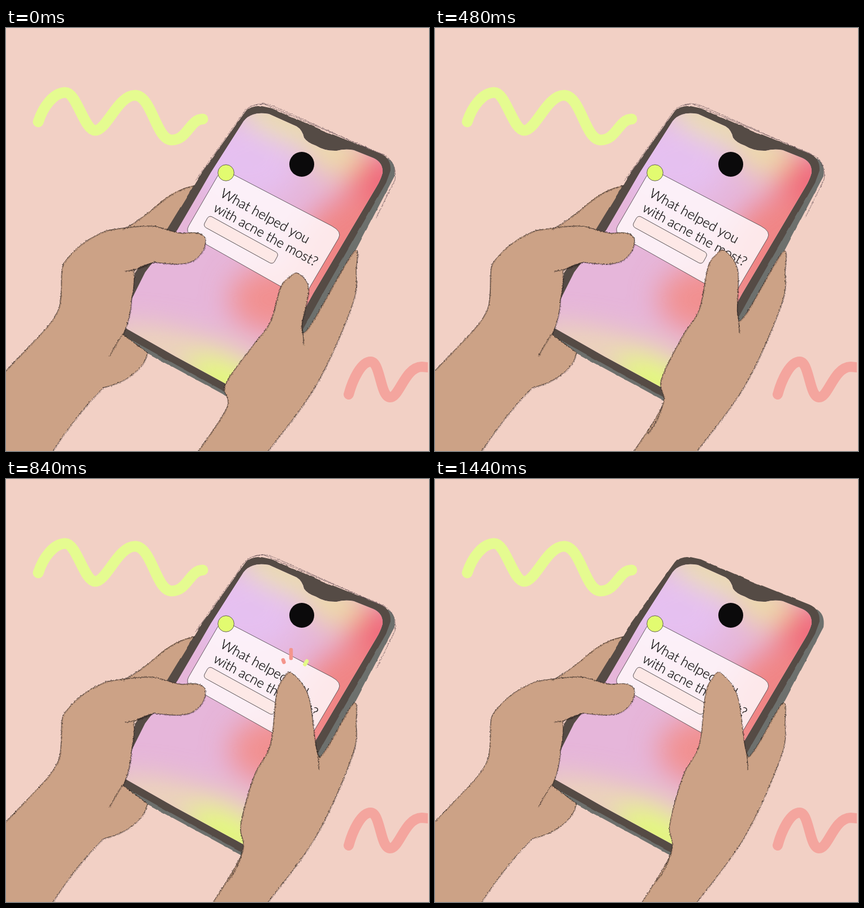
An HTML page that plays this animation: 748 by 748 pixels, repeating every 1.56 s.

```html
<!DOCTYPE html>
<html lang="en">
<head>
<meta charset="utf-8">
<title>Phone survey</title>
<style>
  html, body { margin: 0; height: 100%; overflow: hidden; background: #f2d0c5; }
  svg { display: block; }
  #stage { width: 100vw; height: 100vh; }
  .line { fill: none; stroke-linecap: round; stroke-linejoin: round; }
  .ink { stroke: #2f2521; opacity: .85; }
  .skin { fill: #cca286; }
  .coral { stroke: #f4958c; }
  .lime { stroke: #e4fb88; }
  #edge { stroke: #5c4750; stroke-width: .8; }
  #sparks path { stroke-width: 6.5; vector-effect: non-scaling-stroke; }
  text { font: 300 23.7px Lato, sans-serif; fill: #111; stroke: #111; stroke-width: .3; }
</style>
</head>
<body>
<svg id="stage" viewBox="0 0 748 748">
  <defs>
    <filter id="paint" filterUnits="userSpaceOnUse" x="0" y="0" width="748" height="748">
      <feTurbulence type="fractalNoise" baseFrequency=".04" numOctaves="2" seed="4"/>
      <feDisplacementMap in="SourceGraphic" scale="3" xChannelSelector="R" yChannelSelector="G"/>
    </filter>
    <filter id="pencil" filterUnits="userSpaceOnUse" x="0" y="0" width="748" height="748">
      <feTurbulence id="grain" type="fractalNoise" baseFrequency=".35" numOctaves="2"/>
      <feDisplacementMap in="SourceGraphic" scale="3.5" xChannelSelector="R" yChannelSelector="G"/>
    </filter>
    <filter id="soft" filterUnits="userSpaceOnUse" x="100" y="50" width="700" height="700">
      <feGaussianBlur stdDeviation="25"/>
    </filter>
    <clipPath id="screen">
      <path d="M437 153Q448 149 465 152L514 174Q524 180 527 194Q533 203 548 208Q564 218 585 217Q600 213 615 216L650 230Q667 238 666 256Q662 270 655 281L543 470L440 657L300 581L212 531Q215 505 223 478L246 432L303 357L362 256L420 165Q427 156 437 153Z"/>
    </clipPath>
    <path id="leftShape" d="M-8 614L60 543Q90 512 95 490C101 450 94 425 104 413C128 382 150 370 178 358C215 352 250 348 266 351C285 356 295 361 312 363C330 361 345 360 352 371C355 388 345 403 332 411C318 419 300 419 262 414Q240 420 226 429Q228 455 222 478Q221 512 207 542L250 574Q247 596 222 614Q205 628 172 636Q125 682 78 755H-8Z"/>
    <path id="rightShape"/>
  </defs>

  <rect width="748" height="748" fill="#f2d0c5"/>
  <path class="line" stroke="#e5fb90" stroke-width="19" d="M57 166C66 138 85 114 105 114S138 181 158 181S198 119 228 119S265 198 293 198S325 161 348 161"/>
  <svg width="746" height="748">
    <path class="line" stroke="#f4a59e" stroke-width="18" d="M606 648C613 622 628 590 645 590S662 653 679 653S705 600 735 599L756 601"/>
  </svg>

  <path class="skin" d="M334 278Q300 284 270 310Q235 342 205 358L285 364L340 290Z"/>

  <g filter="url(#paint)">
    <path fill="#6d706d" d="M660 228L676 231Q690 240 687 262L577 472L450 690L416 665L204 550L206 536L420 640Z"/>
    <path fill="#554b45" d="M424 147Q432 137 447 137L470 142L560 181L662 222Q681 230 680 252L672 274L557 475L446 676L412 657L204 542Q208 500 228 432L284 357L347 254Z"/>
  </g>

  <g clip-path="url(#screen)">
    <rect x="190" y="130" width="500" height="530" fill="#e6b6da"/>
    <g filter="url(#soft)">
      <ellipse cx="425" cy="235" rx="95" ry="75" fill="#e5c0f0"/>
      <ellipse cx="665" cy="290" rx="62" ry="72" fill="#f0687a"/>
      <ellipse cx="585" cy="405" rx="75" ry="125" transform="rotate(30 585 405)" fill="#f08585"/>
      <ellipse cx="475" cy="480" rx="80" ry="60" fill="#f19090"/>
      <ellipse cx="585" cy="225" rx="48" ry="34" fill="#eedca6"/>
      <ellipse cx="495" cy="168" rx="95" ry="30" transform="rotate(24 495 168)" fill="#ebdfa8"/>
      <ellipse cx="320" cy="572" rx="150" ry="32" transform="rotate(14 320 572)" fill="#ecd7b6"/>
      <ellipse cx="395" cy="632" rx="85" ry="36" transform="rotate(27 395 632)" fill="#e2fb74"/>
    </g>
  </g>

  <circle cx="523" cy="241" r="22" fill="#0b0a0b"/>
  <g stroke="#443d40" stroke-width=".8">
    <path fill="#fff8fb" fill-opacity=".86" d="M398 257L576 350Q595 360 588 372L525 479L328 368Q317 360 323 350L374 262Q383 248 398 257Z"/>
    <rect width="141" height="22" rx="6" transform="translate(359 331) rotate(28.8)" fill="#fde8e6"/>
    <circle cx="389" cy="256" r="14.3" fill="#e2fb70"/>
  </g>
  <g transform="translate(377.5 297.5) rotate(28.6)">
    <text>What helped you</text>
    <text x="1.5" y="28.6">with acne the most?</text>
  </g>

  <g id="sparks" class="line">
    <path class="coral" d="M-4-43V-28"/>
    <path class="coral" d="M-18-25L-16.5-21"/>
    <path class="lime" d="M24-23L20.5-17"/>
  </g>

  <use href="#leftShape" class="skin"/>
  <use href="#rightShape" class="skin"/>

  <g class="line" filter="url(#pencil)">
    <path id="edge" d="M335 270L422 147Q432 135 455 134L668 224Q692 238 688 268L655 335M438 137Q455 130 475 139L672 227"/>
    <g id="ink" class="ink">
      <use href="#leftShape"/>
      <use href="#rightShape"/>
      <path d="M332 279Q300 285 270 311Q240 338 207 356M211 430Q238 427 262 414M183 580Q195 557 206 541"/>
      <path id="creases"/>
    </g>
    <use id="ghost" href="#ink" x="1" y="1" opacity=".4"/>
  </g>
</svg>

<script>
const STEP = 120, STEPS = 13;
const $ = id => document.getElementById(id);
const set = (id, name, value) => $(id).setAttribute(name, value);
const clamp = v => Math.min(1, Math.max(0, v));
const points = text => text.split(', ').map(p => p.split(' ').map(Number));

// Key points of the right hand at rest: wrist to thumb, then the outer side
const thumb = points('335 755, 390 672, 388 630, 436 562, 467 520, 485 460, 500 441, 517 434, 535 462, 523 528, 538 526');
const outer = points('614 397, 619 430, 612 490, 548 632, 458 755');
const WRIST = 1, WEB = 9;

// Smooth open path through the points
function curve(pts) {
  let d = 'M' + pts[0];
  for (let i = 0; i < pts.length - 1; i++) {
    const p = pts[i], q = pts[i + 1];
    const before = pts[i - 1] || p, after = pts[i + 2] || q;
    const c1 = p.map((v, j) => v + (q[j] - before[j]) / 6);
    const c2 = q.map((v, j) => v - (after[j] - p[j]) / 6);
    d += `C${c1} ${c2} ${q}`;
  }
  return d;
}

// Stretch the thumb upward while the palm rolls over the phone
function reach([x, y], k) {
  const up = clamp((526 - y) / 92);
  const palm = clamp((755 - y) / 229);
  const roll = clamp(((x - 455) / 65) ** 2) * (1 - up);
  return [x + k * (27 * roll - 12 * up), y - k * (47 * palm ** 1.5 + 44 * up)];
}

function draw(step) {
  const k = clamp((step - 2) / 3) ** 2;
  const moved = thumb.map(p => reach(p, k));
  set('rightShape', 'd', curve([...moved, ...outer]) + 'Z');
  set('creases', 'd', `M${moved[WEB]}q3 12 3 32` + (k ? `M${moved[WRIST]}q-8 30-26 50` : ''));

  // The sketch is redrawn with each pose and cleaned up at the end
  const clean = step > 9;
  set('grain', 'seed', 3 + Math.round(k * 9) + 5 * clean);
  set('edge', 'opacity', clean ? 0 : .8);
  set('ghost', 'opacity', clean ? .2 : .4);

  const age = step - 6;
  set('sparks', 'visibility', age >= 0 && age < 4 ? 'visible' : 'hidden');
  set('sparks', 'transform', `translate(508 345) scale(${.8 + .2 * age})`);
}

const start = performance.now();
let shown = -1;
function tick(now) {
  const step = Math.floor(Math.max(0, now - start) / STEP) % STEPS;
  if (step !== shown) draw(shown = step);
  requestAnimationFrame(tick);
}
tick(start);
</script>
</body>
</html>
```
